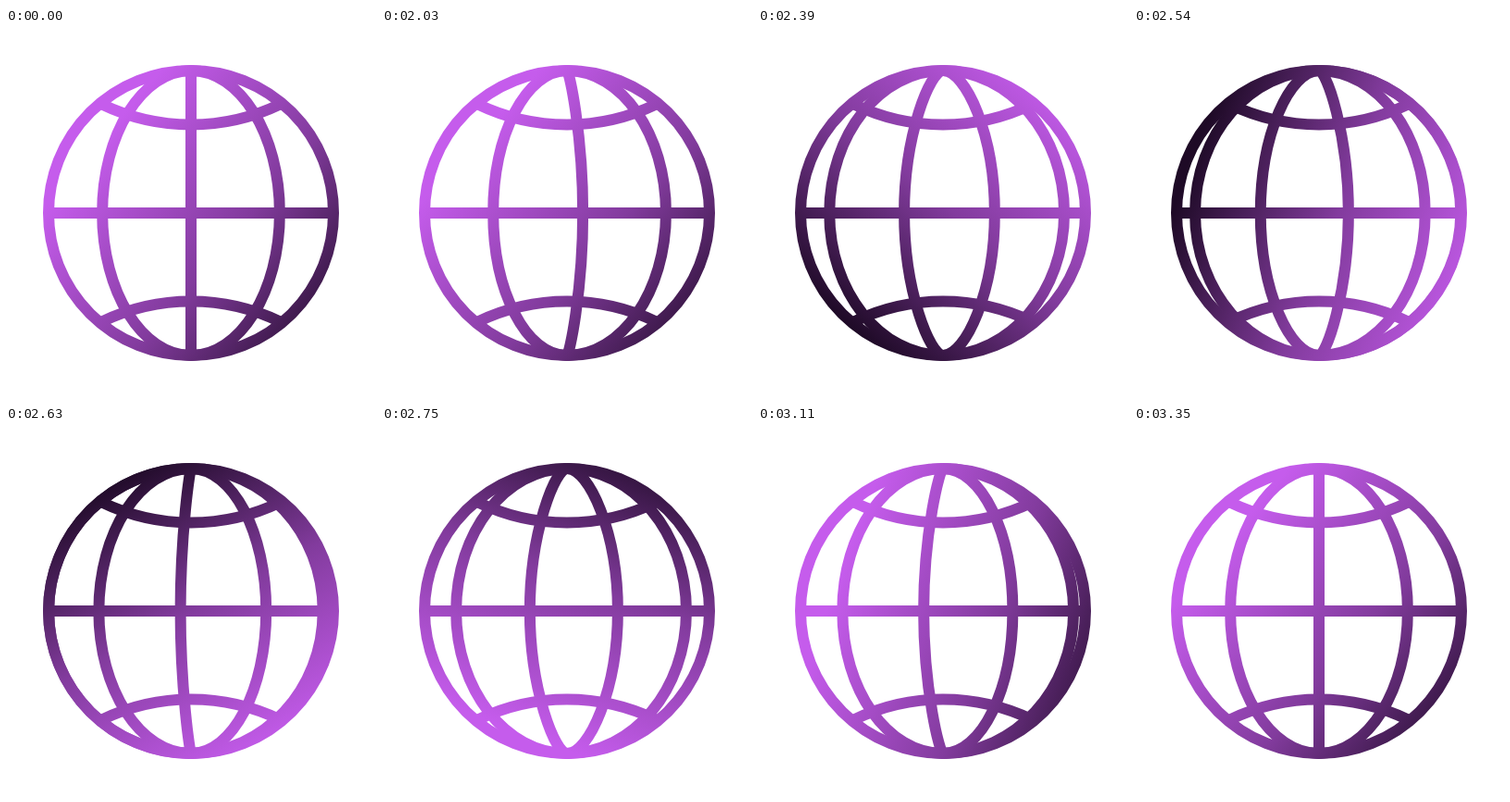
An HTML page with a canvas for the animation above (3.44 s loop, 400x400 px).

```html
<!DOCTYPE html>
<html lang="en">
<head>
<meta charset="utf-8">
<title>Spinning globe</title>
<style>
  html, body { margin: 0; width: 100%; height: 100%; overflow: hidden; background: #fff; }
  canvas { display: block; width: 400px; height: 400px; }
</style>
</head>
<body>
<canvas id="stage" width="400" height="400"></canvas>
<script>
const ctx = document.getElementById('stage').getContext('2d');
const LOOP = 3440, SPIN_START = 2030, STEP = 30, LAST = 44;
const CENTER = 200, RADIUS = 154, LINE = 12;
const RAD = Math.PI / 180;

// Smooth monotone curve through [step, value] points, coming to rest at the end.
function curve(points) {
  const secant = i => (points[i + 1][1] - points[i][1]) / (points[i + 1][0] - points[i][0]);
  const slopes = points.map((_, i) => {
    if (i === points.length - 1) return 0;
    if (i === 0) return secant(0);
    const a = secant(i - 1), b = secant(i);
    return a * b > 0 ? 2 * a * b / (a + b) : 0;
  });
  return x => {
    let i = 0;
    while (i < points.length - 2 && x > points[i + 1][0]) i++;
    const [x0, y0] = points[i], [x1, y1] = points[i + 1];
    const w = x1 - x0, s = (x - x0) / w, r = 1 - s;
    return y0 * r * r * (1 + 2 * s) + y1 * s * s * (3 - 2 * s)
      + w * s * r * (slopes[i] * r - slopes[i + 1] * s);
  };
}

// Turn is counted in meridian gaps; the other two curves are in degrees.
const turnAt = curve([[0, 0.17], [7, 0.91], [17, 2.33], [24, 3.58], [36, 4.79], [44, 5]]);
const gapAt = curve([[0, 37.6], [7, 37.8], [17, 36.2], [24, 36], [36, 37.1], [44, 38.5]]);
const lightAt = curve([[0, -48], [7, -15], [17, 111], [24, 201], [36, 291], [44, 310]]);

const clamp01 = v => Math.max(0, Math.min(1, v));

function gradient(angle) {
  const dx = Math.sin(angle * RAD), dy = -Math.cos(angle * RAD);
  const length = 341, from = 40 * dx - 186, to = from + length;
  const g = ctx.createLinearGradient(CENTER + dx * from, CENTER + dy * from,
                                     CENTER + dx * to, CENTER + dy * to);
  g.addColorStop(0, '#1e0a26');
  g.addColorStop(0.49, '#823b9d');
  g.addColorStop(1, '#c55cec');
  return g;
}

function stroke(build) {
  ctx.beginPath();
  build();
  ctx.stroke();
}

// An elliptic arc far from the axis, more pointed at the poles close to it.
function meridian(degrees) {
  if (Math.abs(degrees) >= 90) return;
  const bulge = RADIUS * Math.sin(degrees * RAD);
  const x = CENTER + bulge, handle = 0.5523 * RADIUS;
  const poleX = CENTER + 0.5523 * bulge * Math.min(1, Math.abs(bulge) / 70);
  const top = CENTER - RADIUS, bottom = CENTER + RADIUS;
  stroke(() => {
    ctx.moveTo(CENTER, top);
    ctx.bezierCurveTo(poleX, top, x, CENTER - handle, x, CENTER);
    ctx.bezierCurveTo(x, CENTER + handle, poleX, bottom, CENTER, bottom);
  });
}

function parallel(sign) {
  const r = 222, half = 0.45, mid = -sign * Math.PI / 2;
  const y = CENTER + sign * (95.5 + r);
  stroke(() => ctx.arc(CENTER, y, r, mid - half, mid + half));
}

function draw(time) {
  const step = Math.floor((time - SPIN_START) / STEP);
  const resting = step < 0 || step >= LAST;
  const turn = resting ? 0 : turnAt(step);
  const gap = resting ? 38.5 : gapAt(step);
  const tuckStart = resting ? 1 : clamp01(1 - step / 6);
  const tuckEnd = resting ? 0 : clamp01((step - 36) / 8);

  ctx.clearRect(0, 0, 400, 400);
  ctx.strokeStyle = gradient(resting ? -50 : lightAt(step));
  ctx.lineWidth = LINE;

  // Outer meridians stay tucked behind the rim while the globe rests,
  // and those entering on the left leave the rim late and fast.
  for (let i = -7; i <= 2; i++) {
    let angle = (i + turn) * gap;
    const tuck = Math.max(Math.abs(i) > 1 ? tuckStart : 0, Math.abs(i + 5) > 1 ? tuckEnd : 0);
    if (Math.abs(angle) < 90) angle += (Math.sign(angle) * 90 - angle) * tuck;
    if (angle < -62) angle += (angle + 62) * 0.8;
    meridian(angle);
  }

  ctx.save();
  ctx.beginPath();
  ctx.arc(CENTER, CENTER, RADIUS, 0, 2 * Math.PI);
  ctx.clip();
  parallel(-1);
  parallel(1);
  ctx.restore();

  stroke(() => { ctx.moveTo(46, CENTER); ctx.lineTo(354, CENTER); });
  stroke(() => ctx.arc(CENTER, CENTER, RADIUS, 0, 2 * Math.PI));
}

const began = performance.now();
function tick() {
  draw((performance.now() - began) % LOOP);
  requestAnimationFrame(tick);
}
tick();
</script>
</body>
</html>
```
